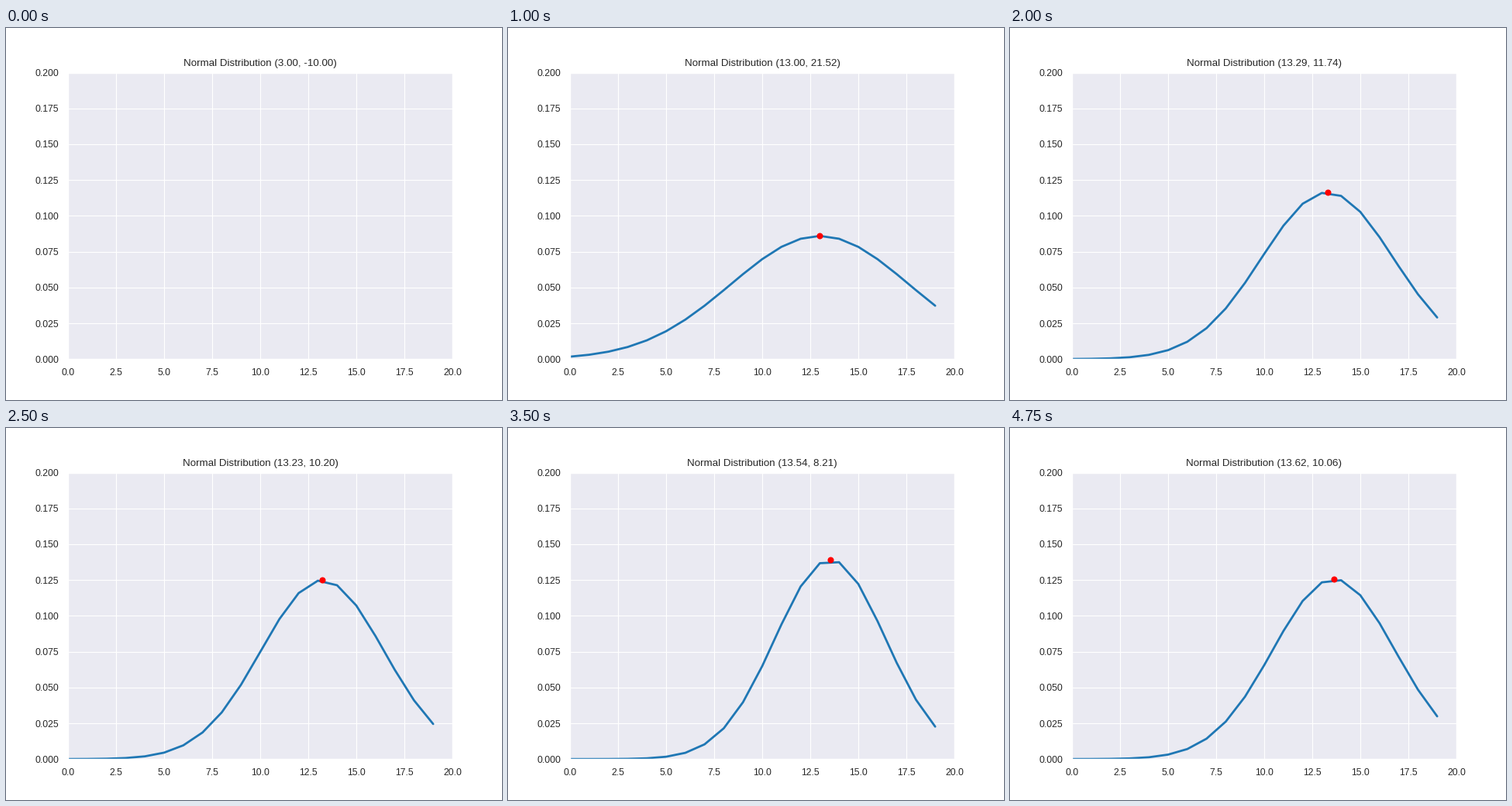
Recreate the animation shown at these times as a matplotlib script. Size 640 by 480 pixels, loop 5000 ms.

```python
import numpy as np
import matplotlib.pyplot as plt
from matplotlib.animation import FuncAnimation

FRAMES = 20
DARK = "#262626"

plt.rcParams.update({
    "font.family": "Liberation Sans",
    "text.color": DARK,
    "axes.facecolor": "#EAEAF2",
    "axes.edgecolor": "white",
    "axes.linewidth": 1.0,
    "axes.axisbelow": True,
    "axes.titlesize": 9.6,
    "grid.color": "white",
    "grid.linewidth": 0.8,
    "lines.solid_capstyle": "round",
})

# Key estimates: observations seen, mean, variance
KEY_N = [0, 1, 2, 4, 8, 12, 14, 17, 19]
KEY_MEAN = [3, 9.72, 11.9, 13, 13.29, 13.18, 13.54, 13.4, 13.62]
KEY_VAR = np.array([-10, 98, 42, 21.52, 11.74, 9.02, 8.21, 10.9, 10.06])


def estimate(n):
    """Between keys the mean and the precision (1 / variance) change evenly."""
    mean = np.interp(n, KEY_N, KEY_MEAN)
    return mean, 1 / np.interp(n, KEY_N, 1 / KEY_VAR)


def normal_pdf(x, mean, var):
    if var <= 0:
        return np.full(len(x), np.nan)
    return np.exp(-(x - mean) ** 2 / (2 * var)) / np.sqrt(2 * np.pi * var)


fig, ax = plt.subplots(figsize=(6.4, 4.8), dpi=100)
ax.set_xlim(0, 20)
ax.set_ylim(0, 0.2)
ax.grid(True)
ax.tick_params(left=False, bottom=False, length=4.8, pad=3.5,
               labelsize=8.8, labelcolor=DARK)

xs = np.arange(20)
curve, = ax.plot([], [], color="#1f77b4", lw=2)
peak, = ax.plot([], [], "o", color="red", ms=4.8, mew=1)
title = ax.set_title("")


def update(i):
    mean, var = estimate(i)
    curve.set_data(xs, normal_pdf(xs, mean, var))
    peak.set_data([mean], normal_pdf(np.array([mean]), mean, var))
    title.set_text(f"Normal Distribution ({mean:.2f}, {var:.2f})")
    return curve, peak, title


def init():
    return update(0)


anim = FuncAnimation(fig, update, frames=FRAMES, init_func=init,
                     interval=250, repeat=True, repeat_delay=0, blit=False)
plt.show()
```
